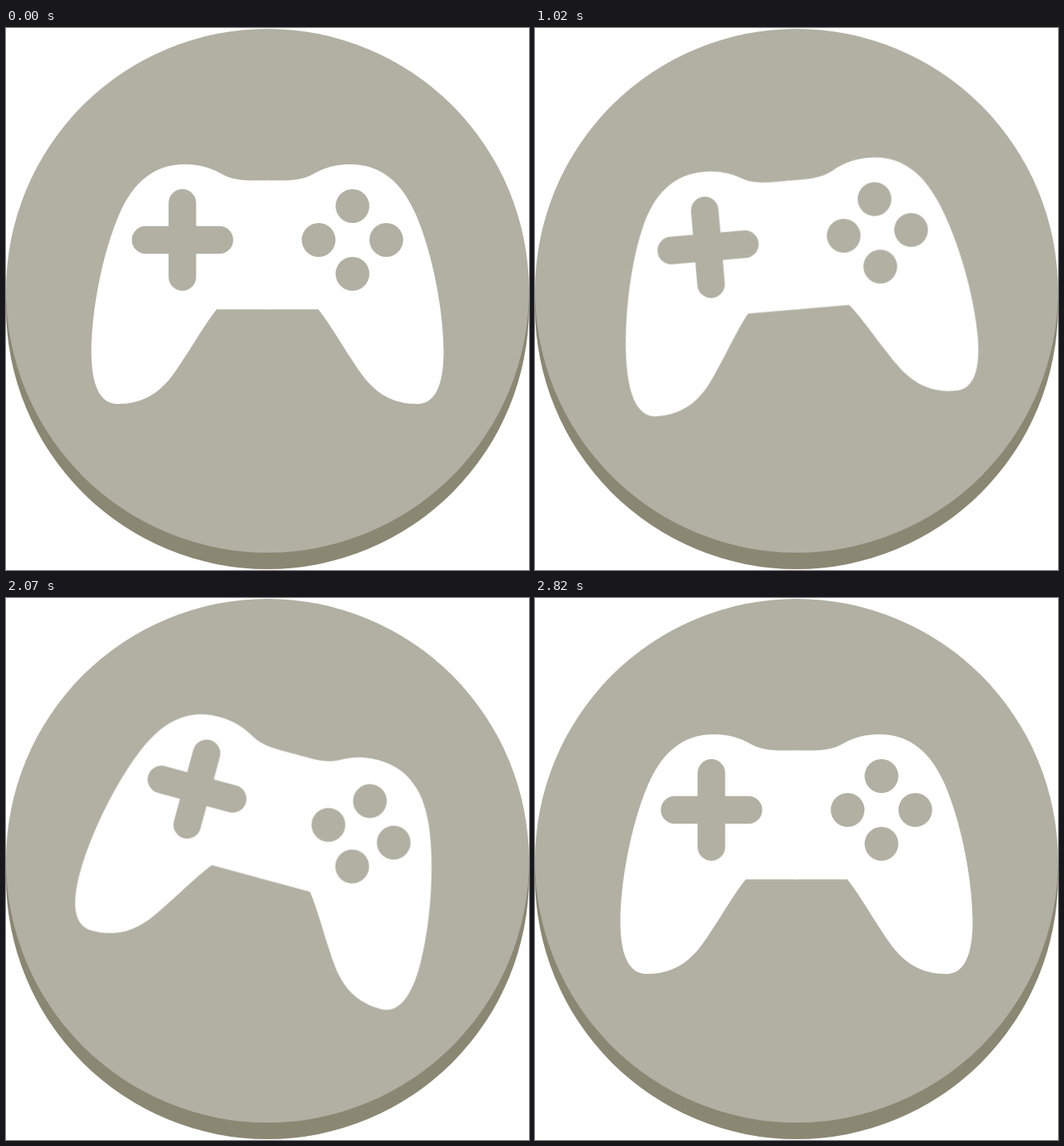
Animation, 634 px wide and 656 px high, one loop 2.85 s. Source, as an HTML page:

```html
<!DOCTYPE html>
<html lang="en">
<head>
<meta charset="utf-8">
<title>Game controller</title>
<style>
  html, body { margin: 0; width: 100%; height: 100%; overflow: hidden; background: #fff; }
  svg { display: block; width: 100%; height: 100%; }

  .face { fill: #b2b0a3; }
  .rim { fill: #8a8773; }
  .shell { fill: #fff; }
  .pad { fill: none; stroke: #b2b0a3; stroke-width: 33.4; stroke-linecap: round; }

  /* 30 ms ticks at a constant rate in each leg of the tilt */
  .controller {
    transform-origin: 317px 310px;
    animation: tilt 2850ms infinite;
  }
  @keyframes tilt {
    0% { transform: rotate(0deg); animation-timing-function: step-end; }
    5.263158% { transform: rotate(0deg); animation-timing-function: steps(23, end); }
    29.473684% { transform: rotate(-9deg); animation-timing-function: steps(38, end); }
    69.473684% { transform: rotate(17deg); animation-timing-function: steps(28, end); }
    98.947368%, 100% { transform: rotate(0deg); }
  }
</style>
</head>
<body>
<svg viewBox="0 0 634 656">
  <circle class="rim" cx="317" cy="338" r="317"/>
  <circle class="face" cx="317" cy="318" r="317"/>
  <g class="controller">
    <g class="shell">
      <path id="half" d="M316 340.5 H378.5
        C393 358 412 392 429 416
        C447 442 468 455 499 455
        C521 455 530.5 430 530.5 392
        C530.5 345 518 275 497 226
        C480 187 455 165 417 165
        C397 165 384 170 372 177
        C361 183 350 184.5 332 184.5
        H316 Z"/>
      <use href="#half" transform="translate(634 0) scale(-1 1)"/>
    </g>
    <path class="pad" d="M169.2 256.5 H258.8 M213.8 211.7 V301.3"/>
    <g class="face">
      <circle cx="379" cy="256.5" r="20.5"/>
      <circle cx="461" cy="256.5" r="20.5"/>
      <circle cx="420" cy="215.5" r="20.5"/>
      <circle cx="420" cy="297.5" r="20.5"/>
    </g>
  </g>
</svg>
</body>
</html>
```
